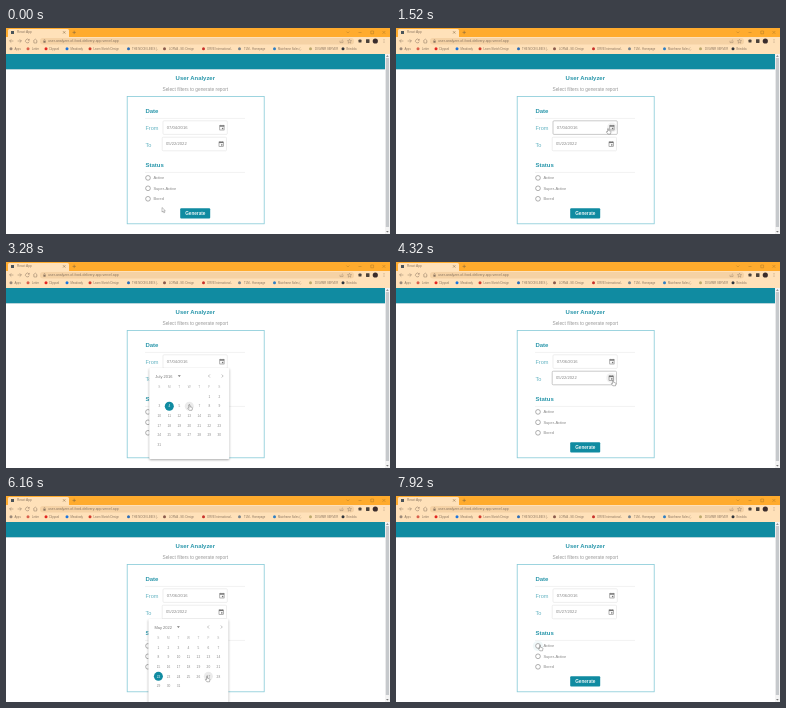
An HTML page for the animation above (8000 ms loop, 384 px wide and 206 px high).

```html
<!DOCTYPE html>
<html lang="en">
<head>
<meta charset="utf-8">
<title>User Analyzer</title>
<style>
html, body { margin: 0; width: 100%; height: 100%; overflow: hidden; background: #fff; }
svg { display: block; width: 100vw; height: 100vh; font-family: "Liberation Sans", Arial, sans-serif; }
.pop > rect { filter: drop-shadow(0 1px 1.3px rgba(0,0,0,.34)); }
</style>
</head>
<body>
<svg id="stage" viewBox="0 0 384 206"></svg>
<script>
const NS = 'http://www.w3.org/2000/svg';
const stage = document.getElementById('stage');
const TEAL = '#108ba1', HEADING = '#2a97ab', DARK = '#8a7560', INK = '#868686', PEACH = '#ffe1b9';

function el(parent, tag, attrs) {
  const n = document.createElementNS(NS, tag);
  for (const k in attrs) n.setAttribute(k, attrs[k]);
  return parent.appendChild(n);
}
const rect = (p, x, y, width, height, fill, more) => el(p, 'rect', { x, y, width, height, fill, ...more });
const dot = (p, cx, cy, r, fill, more) => el(p, 'circle', { cx, cy, r, fill, ...more });
const line = (p, d, stroke, w = 0.5) => el(p, 'path', { d, stroke, 'stroke-width': w, fill: 'none' });
// cy is the middle of the capitals
function text(p, str, x, cy, size, fill, more) {
  const n = el(p, 'text', { x, y: cy + size * 0.36, 'font-size': size, fill, ...more });
  n.textContent = str;
  return n;
}
const mid = { 'text-anchor': 'middle' };
const bold = { 'font-weight': 700 };

function browser() {
  rect(stage, 0, 0, 384, 9, '#ffab2d');
  rect(stage, 2, 1, 61, 9, PEACH, { rx: 1.5 });
  rect(stage, 5, 3, 3, 3, '#4a545a');
  text(stage, 'React App', 11, 4.2, 3.2, DARK);
  line(stage, 'M57 3.2l2.4 2.4m0-2.4l-2.4 2.4M66.5 4.4h3.4m-1.7-1.7v3.4', '#7d6038');
  line(stage, 'M340.5 3.6l1.4 1.4 1.4-1.4M352.5 4.5h3M364.8 3h2.8v2.8h-2.8zM376.5 3l2.8 2.8m0-2.8l-2.8 2.8', '#a87428', 0.45);

  rect(stage, 0, 9, 384, 17, PEACH);
  line(stage, 'M7.4 13H3.6m1.7-1.7L3.6 13l1.7 1.7M11.6 13h3.8m-1.7-1.7l1.7 1.7-1.7 1.7', DARK);
  line(stage, 'M23 12a1.9 1.9 0 1 0 .2 1.6M23.3 10.9v1.4h-1.4M27.2 13l2.1-1.9 2.1 1.9M27.9 12.7v2.3h2.8v-2.3', DARK);
  rect(stage, 34, 10, 314, 6.4, '#f5d2a5', { rx: 3 });
  rect(stage, 37.4, 12.8, 2.2, 1.9, DARK);
  line(stage, 'M37.8 12.8v-.6a.7.7 0 0 1 1.4 0v.6', DARK, 0.4);
  text(stage, 'user-analyzer-of-food-delivery-app.vercel.app', 42, 13.2, 3.5, DARK);
  line(stage, 'M334 12.8v1.8h3v-1.8M335.2 13.4l1.8-1.8M343.5 11.2l.6 1.4 1.5.1-1.2 1 .4 1.5-1.3-.8-1.3.8.4-1.5-1.2-1 1.5-.1z', DARK, 0.4);
  rect(stage, 352.5, 11.6, 3, 3, '#4b423a', { rx: 0.7 });
  rect(stage, 360, 11.2, 3.5, 3.7, '#4b423a', { rx: 0.4 });
  dot(stage, 369.3, 13, 2.6, '#3a2c2c');
  [11.4, 13, 14.6].forEach(y => dot(stage, 378, y, 0.45, DARK));

  const marks = [
    [5, '#9a8878', 'Apps', 8.5], [22, '#d9604c', 'Letter', 26], [40, '#e32622', 'Clipyard', 43],
    [61, '#1d74dd', 'Meadowly', 64.5], [84, '#d33a2c', 'Learn Sketch Design', 87.5],
    [122.5, '#2b6cb8', 'THE NOON LINES |..', 126], [158.5, '#8a5a4c', 'LORVA - SE: Design', 163],
    [197.5, '#c8302a', 'ORVE International..', 201], [233.5, '#77828c', 'TLM - Homepage', 238],
    [268.5, '#2f7fc4', 'Mainframe Sales (..', 272], [304.5, '#bca96c', 'DV-MMR SERVER', 309],
    [337, '#30353c', 'Brindola', 340.5]
  ];
  for (const [x, c, name, tx] of marks) {
    dot(stage, x, 20.8, 1.5, c);
    text(stage, name, tx, 20.8, 2.75, DARK);
  }
}

function page() {
  rect(stage, 0, 26, 379, 15.3, TEAL);
  rect(stage, 0, 41.3, 379, 0.7, '#b9d3d8');
  rect(stage, 379, 26, 5, 180, '#f3f3f3');
  rect(stage, 379.8, 30, 3.2, 169, '#c6c9cc');
  el(stage, 'path', { d: 'M380 28.8l1.4-1.5 1.4 1.5zM380 203l1.4 1.5 1.4-1.5z', fill: '#777' });

  text(stage, 'User Analyzer', 189.3, 50, 5.95, HEADING, { ...mid, ...bold });
  text(stage, 'Select filters to generate report', 189.3, 61.3, 4.8, '#999', mid);
  rect(stage, 121.2, 68.5, 137, 127.3, '#fff', { stroke: '#86cad7', 'stroke-width': 0.8 });
  text(stage, 'Date', 139.4, 82.5, 6, HEADING, bold);
  text(stage, 'Status', 139.4, 136.7, 6, HEADING, bold);
  line(stage, 'M139 90.4h100M139 144.4h100', '#e4e4e4');
  text(stage, 'From', 139.4, 100.1, 5.6, '#63b3c2');
  text(stage, 'To', 139.4, 116.5, 5.6, '#63b3c2');
}

function field(x, y) {
  const box = rect(stage, x, y, 64.3, 13.6, '#fff', { rx: 1, 'stroke-width': 0.6 });
  const ring = dot(stage, x + 59, y + 6.7, 5, '#000');
  const label = text(stage, '', x + 3.8, y + 6.6, 4.15, INK);
  const ix = x + 56.8, iy = y + 4.7, ink = '#737373';
  rect(stage, ix, iy, 4.3, 4.5, 'none', { stroke: ink, 'stroke-width': 0.55 });
  rect(stage, ix, iy, 4.3, 1.2, ink);
  line(stage, `M${ix + 1} ${iy - 0.7}v1m2.3-1v1`, ink, 0.55);
  rect(stage, ix + 2.1, iy + 2.3, 1.4, 1.4, ink);
  return { x, y, box, ring, label };
}

const choices = ['Active', 'Super-Active', 'Bored'];
function choice(name, i) {
  const y = [149.9, 160.3, 170.8][i];
  const halo = dot(stage, 142, y, 5.2, TEAL);
  dot(stage, 142, y, 2.35, '#fff', { stroke: '#858585', 'stroke-width': 0.65 });
  text(stage, name, 147.4, y, 4, INK);
  return { y, halo };
}

const COL = 10, ROW = 9.55;
function calendar(cx, top, month, first, count) {
  const g = el(stage, 'g', { class: 'pop' });
  rect(g, -40, 0, 80, 91, '#fff', { rx: 1 });
  text(g, month, -34, 8.2, 4, '#777');
  el(g, 'path', { d: 'M-11.5 7.3h3l-1.5 1.6z', fill: '#777' });
  line(g, 'M20.6 6.5l-1.5 1.5 1.5 1.5M32.4 6.5l1.5 1.5-1.5 1.5', '#808080');
  [...'SMTWTFS'].forEach((c, i) => text(g, c, (i - 3) * COL, 18.4, 3.1, '#aaa', mid));
  const days = [];
  for (let d = 1; d <= count; d++) {
    const cell = first + d - 1;
    const x = (cell % 7 - 3) * COL, y = 28.7 + Math.floor(cell / 7) * ROW;
    const disc = dot(g, x, y, 4.5, 'none');
    days.push({ d, x, y, disc, label: text(g, d, x, y, 3.2, INK, mid) });
  }
  return { g, cx, top, days };
}

browser();
page();
const fields = [field(157, 92.8), field(156.2, 109.2)];
const radios = choices.map(choice);
const button = rect(stage, 174.2, 180.2, 30, 10.2, TEAL, { rx: 1 });
text(stage, 'Generate', 189.3, 185.2, 4.7, '#e8f4f6', { ...mid, ...bold });

const pickers = [
  { ...calendar(183.3, 106, 'July 2016', 5, 31), open: 2100, pick: 3650, days0: [4, 6], fmt: d => `07/0${d}/2016` },
  { ...calendar(182.4, 123, 'May 2022', 0, 31), open: 4680, pick: 6625, days0: [22, 27], fmt: d => `05/${d}/2022` }
];

const pointer = el(stage, 'g', {});
const shapes = {
  arrow: el(pointer, 'path', { d: 'M0 0v4.6l1.1-1 .8 1.8.8-.4-.8-1.7h1.5z', fill: '#fff', stroke: '#666', 'stroke-width': 0.4 }),
  hand: el(pointer, 'path', { d: 'M-.5 0q.5-.6 1 0v1.8l2 .5q.5.2.4 1l-.4 2h-2.6l-1.6-2q.1-.7.8-.4l.4.4z', fill: '#fff', stroke: '#555', 'stroke-width': 0.4 }),
  beam: el(pointer, 'path', { d: 'M-.8-2h1.6M0-2v4M-.8 2h1.6', fill: 'none', stroke: '#666', 'stroke-width': 0.45 })
};

// cubic-bezier(.4, 0, .2, 1)
function ease(x) {
  if (x <= 0) return 0;
  if (x >= 1) return 1;
  let lo = 0, hi = 1;
  for (let i = 0; i < 22; i++) {
    const u = (lo + hi) / 2, v = 1 - u;
    if (1.2 * v * v * u + 0.6 * v * u * u + u * u * u < x) lo = u; else hi = u;
  }
  return 3 * (1 - lo) * lo * lo + lo * lo * lo;
}

const track = [
  [0, 156, 179.5], [80, 157, 178], [720, 205, 101.5], [1200, 205, 101.5], [1840, 219, 100],
  [2560, 219, 100], [3280, 183.5, 143], [3720, 183.5, 143], [4240, 217, 118.5],
  [4860, 217, 118.5], [5440, 203.5, 168.5], [5680, 203.5, 168.5], [6080, 201, 180.5],
  [7040, 201, 180.5], [7840, 144, 149.5], [8000, 144, 149.5]
];
function place(t) {
  const i = track.findIndex(k => k[0] > t);
  const [t0, x0, y0] = track[i - 1], [t1, x1, y1] = track[i];
  const u = (t - t0) / (t1 - t0), s = u * u * (3 - 2 * u);
  return [x0 + (x1 - x0) * s, y0 + (y1 - y0) * s];
}

const GROW = 320;
function grow(p, t) {
  const closing = t >= p.pick;
  const u = (t - (closing ? p.pick : p.open)) / GROW;
  const alpha = closing ? 1 - ease(u) : ease(u);
  const k = closing ? 1 - ease((u - 0.333) / 0.666) : ease(u / 0.666);
  return { alpha, scale: 0.75 + 0.25 * k };
}

const within = (x, y, bx, by, w, h) => x >= bx && x <= bx + w && y >= by && y <= by + h;

function draw(t) {
  const [mx, my] = place(t);
  let shape = 'arrow', covered = false;

  pickers.forEach((p, i) => {
    const { alpha, scale } = grow(p, t);
    const chosen = p.days0[t >= p.pick ? 1 : 0];
    p.g.setAttribute('opacity', alpha);
    p.g.setAttribute('display', alpha > 0 ? 'inline' : 'none');
    p.g.setAttribute('transform', `translate(${p.cx} ${p.top}) scale(${scale} ${scale * scale})`);
    const active = t >= p.open && t < p.pick + GROW;
    if (active && within(mx, my, p.cx - 40, p.top, 80, 91)) covered = true;
    for (const c of p.days) {
      const over = active && Math.hypot(mx - p.cx - c.x, my - p.top - c.y) < 4.5;
      if (over) shape = 'hand';
      c.disc.setAttribute('fill', c.d === chosen ? TEAL : over ? '#ebebeb' : 'none');
      c.label.setAttribute('fill', c.d === chosen ? '#fff' : INK);
    }
    const f = fields[i];
    f.label.textContent = p.fmt(chosen);
    const over = !covered && within(mx, my, f.x, f.y, 64.3, 13.6);
    const icon = over && mx > f.x + 54;
    if (over) shape = icon ? 'hand' : 'beam';
    f.box.setAttribute('stroke', over ? '#a6a6a6' : '#e2e2e2');
    const press = t >= p.open - 80 && t < p.open + 450;
    f.ring.setAttribute('opacity', press ? 0.2 : icon ? 0.05 : 0);
  });

  for (const r of radios) {
    const over = !covered && Math.hypot(mx - 142, my - r.y) < 5;
    if (over) shape = 'hand';
    r.halo.setAttribute('opacity', over ? 0.06 : 0);
  }
  const onButton = !covered && within(mx, my, 174.2, 180.2, 30, 10.2);
  if (onButton) shape = 'hand';
  button.setAttribute('fill', onButton ? '#0d7f93' : TEAL);

  pointer.setAttribute('transform', `translate(${mx} ${my})`);
  for (const k in shapes) shapes[k].setAttribute('display', k === shape ? 'inline' : 'none');
}

const LOOP = 8000, STEP = 80;
function tick() {
  const t = performance.now() % LOOP;
  draw(Math.floor(t / STEP) * STEP);
  requestAnimationFrame(tick);
}
tick();
</script>
</body>
</html>
```
